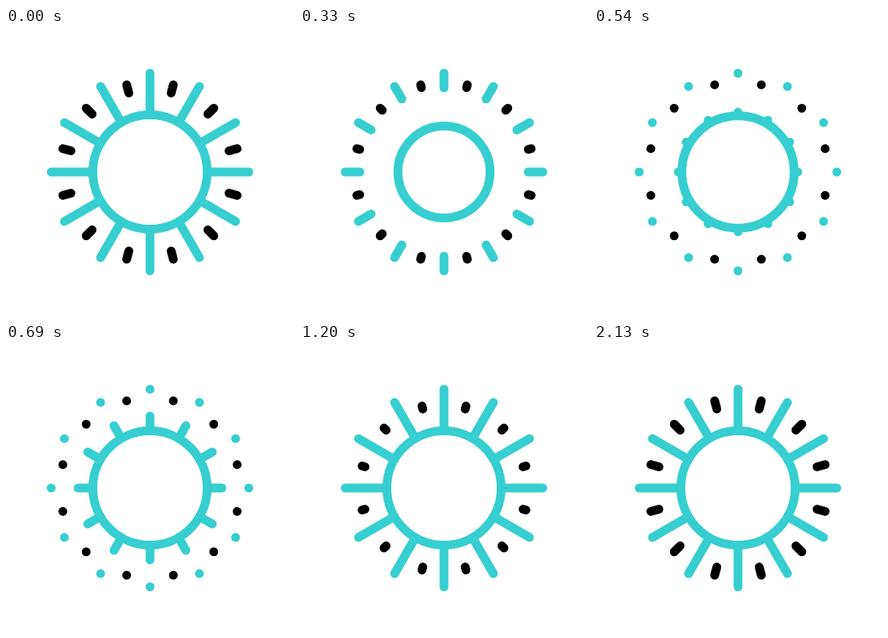
An HTML page with a canvas for the animation above (2160 ms loop, 360 by 360 pixels).

```html
<!DOCTYPE html>
<html lang="en">
<head>
<meta charset="utf-8">
<title>Sun</title>
<style>
html, body { margin: 0; width: 100%; height: 100%; overflow: hidden; background: #fff; }
canvas { display: block; }
</style>
</head>
<body>
<canvas id="stage" width="360" height="360"></canvas>
<script>
const ctx = document.getElementById('stage').getContext('2d');
const LOOP = 2160, PHASE = 510, DIP = 600, SWAP = 810;
const TEAL = '#36cecf', BLACK = '#000';
const RING = 71.5, TIP = 123.5, DASH_IN = 102.3, DASH_OUT = 112.8;

const progress = (t, start) => Math.min(1, Math.max(0, (t - start) / PHASE));
const mix = (a, b, p) => a + (b - a) * p;

// Twelve radial strokes between two radii; a zero length leaves round dots.
function spokes(from, to, color, turn) {
  ctx.strokeStyle = color;
  ctx.beginPath();
  for (let i = 0; i < 12; i++) {
    const a = (i * 30 + turn) * Math.PI / 180;
    const x = Math.cos(a), y = Math.sin(a), end = Math.max(to, from + 0.02);
    ctx.moveTo(x * from, y * from);
    ctx.lineTo(x * end, y * end);
  }
  ctx.stroke();
}

function draw(t) {
  ctx.setTransform(1, 0, 0, 1, 0, 0);
  ctx.fillStyle = '#fff';
  ctx.fillRect(0, 0, 360, 360);
  ctx.translate(180, 180);
  ctx.lineWidth = 11;
  ctx.lineCap = 'round';

  const leave = progress(t, 0);
  const grow = progress(t, PHASE);
  const stretch = progress(t, 2 * PHASE);

  if (t < SWAP) {
    spokes(mix(RING, TIP, leave), TIP, TEAL, 0);
    spokes(mix(DASH_IN, DASH_OUT, leave), DASH_OUT, BLACK, 15);
  } else {
    spokes(DASH_IN, mix(DASH_IN, DASH_OUT, stretch), BLACK, 15);
  }
  if (t >= PHASE) spokes(RING, mix(RING, TIP, grow), TEAL, 0);

  // The ring shrinks to 80% and eases back.
  const dip = t < DIP ? (1 - Math.cos(2 * Math.PI * t / DIP)) / 2 : 0;
  ctx.strokeStyle = TEAL;
  ctx.beginPath();
  ctx.arc(0, 0, RING * (1 - 0.2 * dip), 0, 2 * Math.PI);
  ctx.stroke();
}

const began = performance.now();
function tick() {
  draw((performance.now() - began) % LOOP);
  requestAnimationFrame(tick);
}
tick();
</script>
</body>
</html>
```
